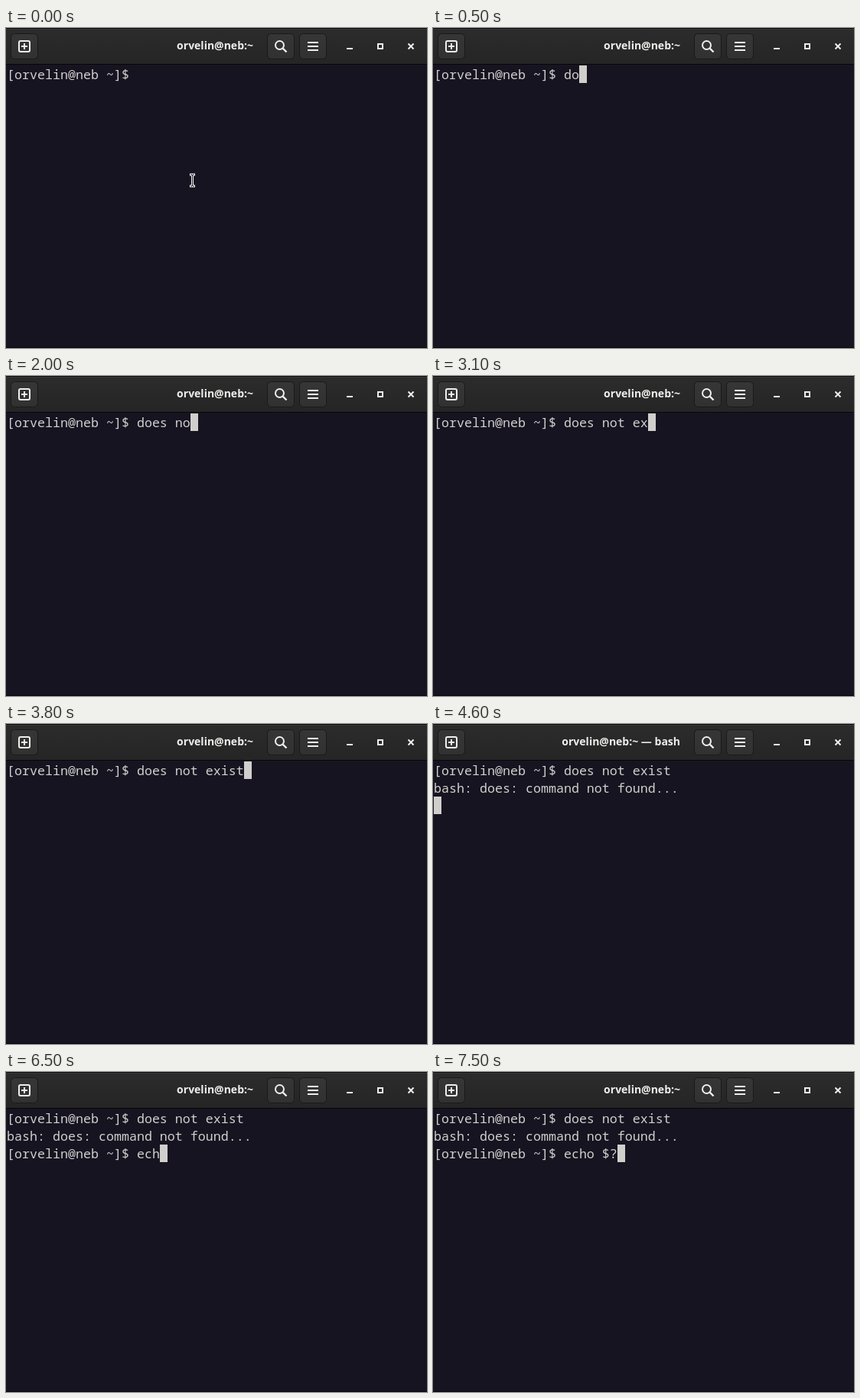
Write an HTML page that moves like this. It is 550 px wide and 419 px high and loops after 8000 ms.

```html
<!DOCTYPE html>
<html lang="en">
<head>
<meta charset="utf-8">
<title>Terminal</title>
<style>
  html, body { margin: 0; width: 100%; height: 100%; overflow: hidden; background: #171421; }
  svg { display: block; }
  .mono { font: 16.6667px "Noto Sans Mono", monospace; fill: #d0cfcc; white-space: pre; }
  .title { font: 700 14px "Noto Sans", sans-serif; fill: #eeeeec; text-anchor: end; }
  .button { fill: url(#face); stroke: #191919; }
  .icon { fill: none; stroke: #eeeeec; stroke-width: 2; }
</style>
</head>
<body>
<svg width="550" height="419" viewBox="0 0 550 419">
  <defs>
    <linearGradient id="bar" x2="0" y2="1">
      <stop stop-color="#2c2c2c"/><stop offset="1" stop-color="#252525"/>
    </linearGradient>
    <linearGradient id="face" x2="0" y2="1">
      <stop stop-color="#363636"/><stop offset="1" stop-color="#313131"/>
    </linearGradient>
  </defs>

  <rect width="550" height="419" fill="#171421"/>
  <rect width="550" height="47" fill="url(#bar)"/>
  <rect width="550" height="1" fill="#0c0c0c"/>
  <rect y="1" width="550" height="1" fill="#383838"/>
  <rect y="47" width="550" height="1" fill="#070707"/>
  <rect y="418" width="550" height="1" fill="#08070b"/>

  <g class="button">
    <rect x="6.5" y="7.5" width="35" height="33" rx="5"/>
    <rect x="341.5" y="7.5" width="35" height="33" rx="5"/>
    <rect x="383.5" y="7.5" width="35" height="33" rx="5"/>
  </g>
  <g class="icon">
    <rect x="17" y="17" width="14" height="14" rx="2"/>
    <path d="M20 24h8M24 20v8"/>
    <circle cx="357.5" cy="22.5" r="5.5"/>
    <path d="M361.5 26.5l5 5" stroke-width="2.4"/>
    <path d="M394 19h14M394 24h14M394 29h14"/>
    <path d="M445 27h8"/>
    <rect x="486" y="21" width="6" height="6"/>
    <path d="M525.5 20.5l7 7M532.5 20.5l-7 7"/>
  </g>

  <text class="title" id="title" x="323" y="28"></text>
  <g class="mono">
    <text id="line0" x="1" y="67"></text>
    <text id="line1" x="1" y="90"></text>
    <text id="line2" x="1" y="113"></text>
  </g>
  <rect id="cursor" width="10" height="23" fill="#d0cfcc"/>
  <g id="pointer" fill="none">
    <path d="M240 192h7M240 207h7M243.5 191v17" stroke="#fff" stroke-width="3"/>
    <path d="M241 192h2M244 192h2M241 207h2M244 207h2M243.5 192v15" stroke="#111" stroke-width="1"/>
  </g>
</svg>
<script>
const LOOP = 8000;
const host = "orvelin@neb";
const prompt = `[${host} ~]$ `;
const first = {
  text: "does not exist",
  keys: [200, 500, 600, 800, 900, 1500, 2000, 2300, 2400, 2900, 3100, 3400, 3500, 3800]
};
const second = {
  text: "echo $?",
  keys: [6100, 6400, 6500, 6700, 6900, 7200, 7500]
};
const ENTER = 4400, BUSY = 4600, READY = 4700;

const el = id => document.getElementById(id);
const within = (t, from, to) => t >= from && t < to;
const show = (node, on) => node.setAttribute("visibility", on ? "visible" : "hidden");
const typed = (command, t) =>
  prompt + command.text.slice(0, command.keys.filter(key => key <= t).length);

function setText(id, text) {
  if (el(id).textContent !== text) el(id).textContent = text;
}

function draw(t) {
  const lines = [
    typed(first, t),
    t >= ENTER ? "bash: does: command not found..." : "",
    t >= READY ? typed(second, t) : ""
  ];
  lines.forEach((line, i) => setText("line" + i, line));
  setText("title", host + ":~" + (within(t, BUSY, READY) ? " — bash" : ""));

  const row = t < ENTER ? 0 : 2;
  el("cursor").setAttribute("x", 1 + 10 * lines[row].length);
  el("cursor").setAttribute("y", 49 + 23 * row);
  show(el("cursor"), t >= 200 && !within(t, 5000, 5600));
  show(el("pointer"), t < 200);
}

const start = performance.now();
function frame() {
  draw((performance.now() - start) % LOOP);
  requestAnimationFrame(frame);
}
frame();
</script>
</body>
</html>
```
